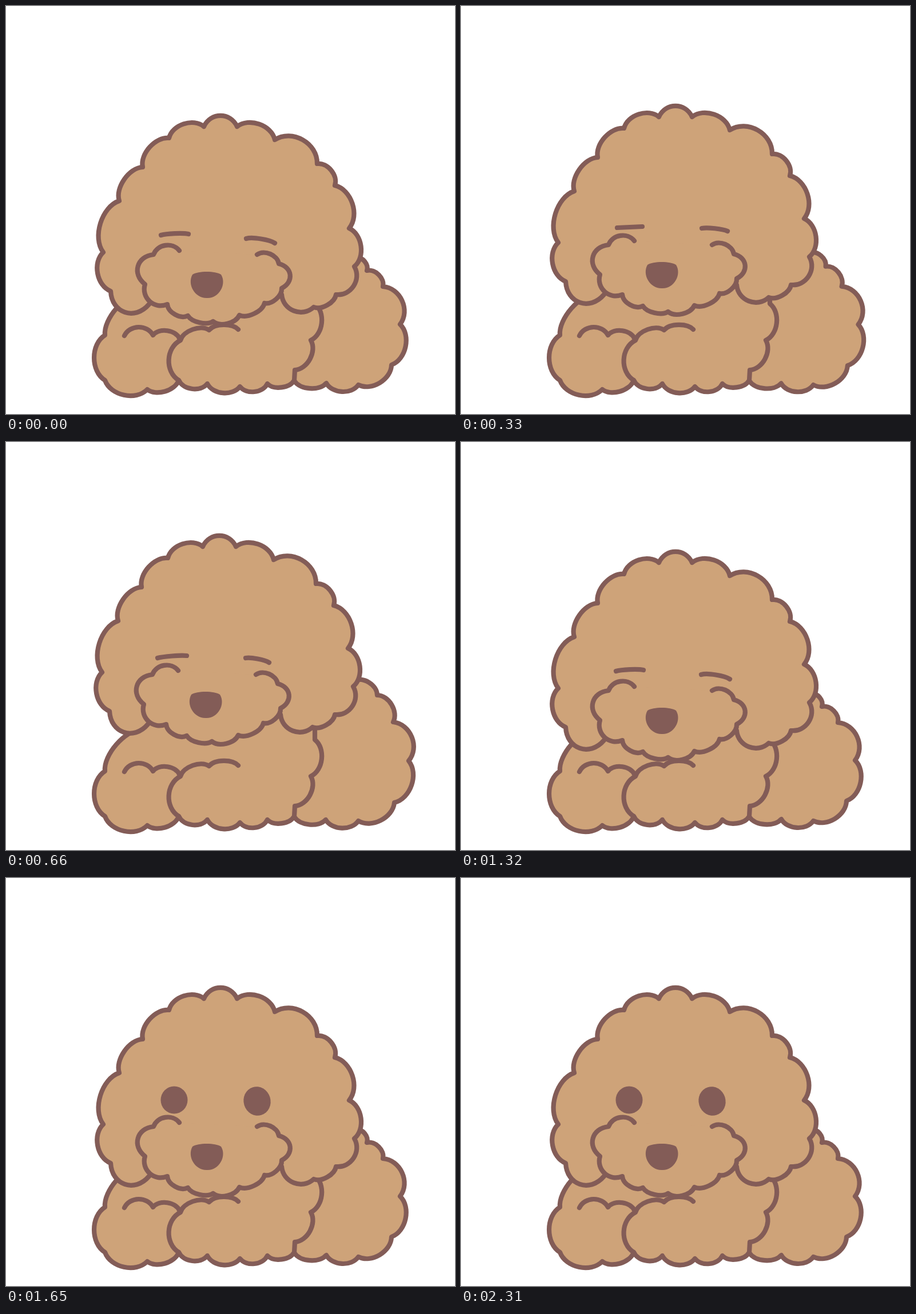
These frames come from a looping animation (785 px wide and 714 px high, 2640 ms). An HTML page with a canvas:

```html
<!DOCTYPE html>
<html lang="en">
<head>
<meta charset="utf-8">
<title>Sleepy poodle</title>
<style>
  html, body { margin: 0; width: 100%; height: 100%; overflow: hidden; background: #fff; }
  canvas { display: block; }
</style>
</head>
<body>
<canvas id="stage" width="785" height="714"></canvas>
<script>
const ctx = document.getElementById('stage').getContext('2d');
const FUR = '#cea379', LINE = '#835c57';
const STEP = 330, LOOP = 2640, MAX_LIFT = 28;
const BULGE = 0.24, INSET = 0.2;

// "x,y" or "x,y,bulge": the bulge belongs to the curl that ends there.
const points = text => text.trim().split(/\s+/).map(p => p.split(',').map(Number));

// Joins points clockwise with round curls whose height follows their width.
function curls(pts) {
  const path = new Path2D();
  pts.forEach(([x, y, bulge = BULGE], i) => {
    if (!i) return path.moveTo(x, y);
    const [px, py] = pts[i - 1];
    const dx = x - px, dy = y - py, h = bulge * 4 / 3;
    path.bezierCurveTo(
      px + dx * INSET + dy * h, py + dy * INSET - dx * h,
      x - dx * INSET + dy * h, y - dy * INSET - dx * h, x, y);
  });
  return path;
}
const shape = text => curls(points(text));

const hair = shape(`250,522 183,499,.38 170,431 198,341,.21 239,282,.2 285,231,.21
  346,211 404,211,.33 470,234 544,276,.28 575,314 600,389 609,456
  577,505,.3 538,527,.19 482,505,.31`);
const muzzle = shape(`439,435 477,451 482,494,.4 452,520,.2 408,541,.18 362,552,.2
  318,542,.16 282,522,.22 243,487,.32 258,435,.38 303,428,.28`);
const nose = shape('326,470 376,470,.1 352,511,.28 326,470,.28');
const torso = shape(`530,470 540,498,0 540,521,0 533,585 505,637 504,655,0 457,661,.2
  409,666 352,661 302,655 247,671,.21 173,655 173,576 236,503,.16 250,440,0`);
const paws = [
  shape('207,577 257,576,.29 304,583'),
  shape('302,655 305,585,.27 355,567,.2 406,566,.17')
];

const rumpLow = points('612,440 631,463 659,491 689,557,.28 674,628 616,663 560,660 504,656,.2');
const rumpHigh = points('608,418 649,443 677,490 704,558,.28 679,631 616,663 559,661 504,656,.2');

// The rump swells with the square of the breath.
function rump(lift) {
  const k = (lift / MAX_LIFT) ** 2;
  return curls(rumpLow.map(([x, y, bulge], i) =>
    [x + (rumpHigh[i][0] - x) * k, y + (rumpHigh[i][1] - y) * k, bulge]));
}

function pose(lift, shift, left, right) {
  const back = rump(lift);
  const under = new Path2D(back);
  under.lineTo(500, 510);
  return { lift, shift, lids: [shape(left), shape(right)], back, under };
}

const rest = pose(0, 0, '271,401 319,399,.04', '420,407 470,415,.07');
const breath = [
  rest,
  pose(17, 0, '273,388 317,386,0', '421,389 466,394,.05'),
  pose(MAX_LIFT, -2, '265,378 316,374,.03', '419,378 460,386,.06'),
  pose(8, 0, '272,397 318,394,0', '419,398 470,403,0')
];

function eye(x, y, rx, ry, tilt) {
  ctx.beginPath();
  ctx.ellipse(x, y, rx, ry, tilt, 0, Math.PI * 2);
  ctx.fill();
}

function fill(color, ...paths) {
  ctx.fillStyle = color;
  paths.forEach(path => ctx.fill(path));
}

function stroke(...paths) {
  paths.forEach(path => ctx.stroke(path));
}

function draw(step) {
  const p = breath[step] || rest;
  const awake = step > breath.length && step % 2 === 1;
  ctx.fillStyle = '#fff';
  ctx.fillRect(0, 0, 785, 714);
  ctx.strokeStyle = LINE;
  ctx.lineWidth = 8.2;
  ctx.lineCap = ctx.lineJoin = 'round';

  fill(FUR, p.under);
  stroke(p.back);
  fill(FUR, torso);
  stroke(torso, ...paws);

  ctx.save();
  ctx.translate(p.shift, -p.lift);
  fill(FUR, hair, muzzle);
  stroke(hair, muzzle);
  fill(LINE, nose);
  ctx.restore();

  if (awake) {
    ctx.fillStyle = LINE;
    eye(294, 388.5, 23.5, 24, 0);
    eye(439, 390.5, 23.5, 25.5, -0.3);
  } else {
    stroke(...p.lids);
  }
}

const start = performance.now();
let shown = -1;
function tick() {
  const step = Math.floor((performance.now() - start) % LOOP / STEP);
  if (step !== shown) draw(shown = step);
  requestAnimationFrame(tick);
}
tick();
</script>
</body>
</html>
```
